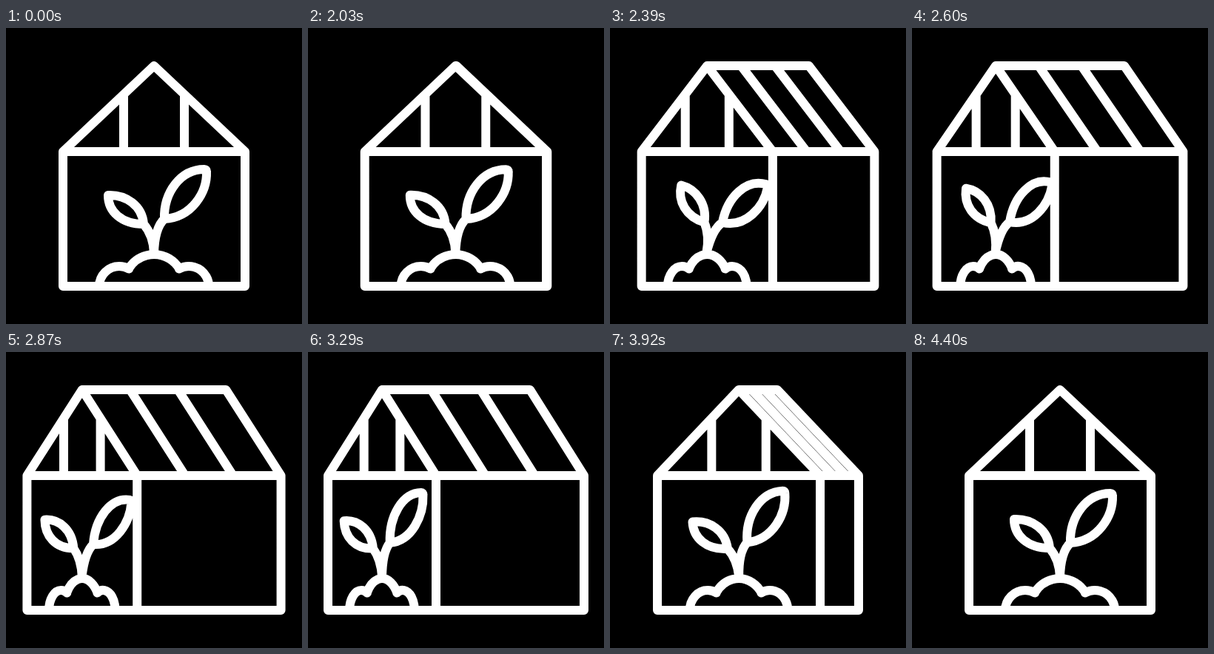
Recreate the animation shown at these times as an HTML page with a canvas. Size 400 by 400 pixels, loop 4.43 s.

```html
<!DOCTYPE html>
<html lang="en">
<head>
<meta charset="utf-8">
<title>Greenhouse</title>
<style>
  html, body { margin: 0; width: 100%; height: 100%; overflow: hidden; background: #000; }
  canvas { display: block; width: 100vw; height: 100vh; }
</style>
</head>
<body>
<canvas id="stage" width="400" height="400"></canvas>
<script>
const ctx = document.getElementById('stage').getContext('2d');
const LOOP = 4430, START = 2030, STEP = 30;
const TOP = 51, EAVE = 167, FLOOR = 349, HALF = 123, MAX_TURN = 50;

// Lean of each leaf in degrees: [time, angle]
const LEAN_LEFT = [[2000, 0], [2390, 15], [2870, -0.6], [3250, -1.5], [3590, -6.6], [3920, -3.2], [4400, 0]];
const LEAN_RIGHT = [[2000, 0], [2390, 14.4], [2870, 6.8], [3250, 0], [3590, -6], [3920, -2.8], [4400, 0]];

// Cubic Bezier easing with flat ends: y runs 0, 0, 1, 1
function ease(p, x1, x2) {
  if (p <= 0) return 0;
  if (p >= 1) return 1;
  let lo = 0, hi = 1;
  for (let i = 0; i < 24; i++) {
    const u = (lo + hi) / 2, v = 1 - u;
    const x = 3 * v * v * u * x1 + 3 * v * u * u * x2 + u * u * u;
    if (x < p) lo = u; else hi = u;
  }
  return lo * lo * (3 - 2 * lo);
}

// Smooth curve through timed keys, level at both ends
function spline(keys, t) {
  const last = keys.length - 1;
  if (t <= keys[0][0]) return keys[0][1];
  if (t >= keys[last][0]) return keys[last][1];
  const slope = n => n === 0 || n === last ? 0
    : (keys[n + 1][1] - keys[n - 1][1]) / (keys[n + 1][0] - keys[n - 1][0]);
  const i = keys.findIndex(k => k[0] > t) - 1;
  const [t0, a] = keys[i], [t1, b] = keys[i + 1];
  const d = t1 - t0, u = (t - t0) / d, v = 1 - u;
  return a * v * v * (1 + 2 * u) + b * u * u * (3 - 2 * u)
    + d * u * v * (slope(i) * v - slope(i + 1) * u);
}

const turnAt = t =>
  MAX_TURN * (ease((t - 2000) / 1150, 0.2, 0.09) - ease((t - 3340) / 1060, 0.41, 0.36));

function line(x1, y1, x2, y2) {
  ctx.moveTo(x1, y1);
  ctx.lineTo(x2, y2);
}

// Adds a path under a local transform, leaving the line width unscaled
function placed(x, y, sx, degrees, trace) {
  ctx.save();
  ctx.translate(x, y);
  ctx.scale(sx, 1);
  ctx.rotate(degrees * Math.PI / 180);
  trace();
  ctx.restore();
}

function house(turn) {
  const left = 200 - HALF - turn, right = 200 + HALF + turn;
  const corner = 200 + HALF - 3 * turn;
  const apex = 200 - 2 * turn, depth = 4 * turn;
  const post = (corner - left) / 6;

  ctx.rect(left, EAVE, right - left, FLOOR - EAVE);
  line(corner, EAVE, corner, FLOOR);
  line(left, EAVE, apex, TOP);
  ctx.lineTo(apex + depth, TOP);
  ctx.lineTo(right, EAVE);
  for (let i = 0; i < 3; i++) {
    const shift = depth * i / 3;
    line(apex + shift, TOP, corner + shift, EAVE);
  }
  const postTop = TOP + (EAVE - TOP) / 3;
  for (const side of [-1, 1]) line(apex + side * post, postTop, apex + side * post, EAVE);
}

function mound() {
  ctx.moveTo(-74, 0);
  ctx.arc(-47, 0, 27, Math.PI, -1.06);
  ctx.moveTo(-34, -23.5);
  ctx.arc(0, -3, 40, Math.PI + 0.54, -0.54);
  ctx.moveTo(34, -23.5);
  ctx.arc(47, 0, 27, -Math.PI + 1.06, 0);
}

function leftLeaf() {
  ctx.moveTo(0, 4);
  ctx.quadraticCurveTo(-1, -20, -14, -35);
  ctx.bezierCurveTo(-44, -35, -62, -52, -62, -74);
  ctx.bezierCurveTo(-38, -75, -16, -60, -14, -35);
}

function rightLeaf() {
  ctx.moveTo(0, 4);
  ctx.quadraticCurveTo(1, -30, 14, -42);
  ctx.bezierCurveTo(13, -78, 36, -109, 68, -109);
  ctx.quadraticCurveTo(71, -109, 71, -106);
  ctx.bezierCurveTo(72, -78, 51, -44, 14, -42);
}

function draw(t) {
  const turn = turnAt(t), x = 200 - 2 * turn;
  // The mound narrows with the front wall, the leaves half as much
  const moundWidth = 1 - turn / HALF, leafWidth = 1 - turn / (2 * HALF);
  ctx.fillStyle = '#000';
  ctx.fillRect(0, 0, 400, 400);
  ctx.strokeStyle = '#fff';
  ctx.lineWidth = 12;
  ctx.lineCap = ctx.lineJoin = 'round';
  ctx.beginPath();
  house(turn);
  placed(x, FLOOR, moundWidth, 0, mound);
  placed(x, 300, leafWidth, spline(LEAN_LEFT, t), leftLeaf);
  placed(x, 300, leafWidth, spline(LEAN_RIGHT, t), rightLeaf);
  ctx.stroke();
}

const begin = performance.now();
function tick() {
  const t = (performance.now() - begin) % LOOP;
  draw(t < START ? 0 : START + Math.floor((t - START) / STEP) * STEP);
  requestAnimationFrame(tick);
}
tick();
</script>
</body>
</html>
```
